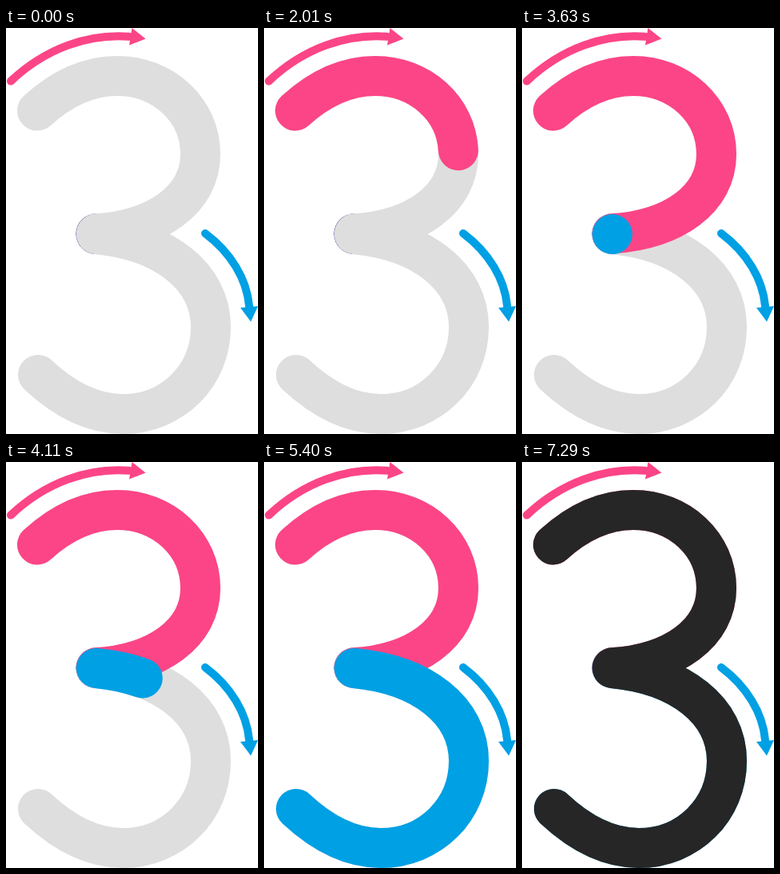
Animation of 315 by 508 pixels, one loop 9 s. Source, as an HTML page:

```html
<!DOCTYPE html>
<html lang="en">
<head>
<meta charset="utf-8">
<title>Writing the number 3</title>
<style>
  :root { --pink: #fc4586; --blue: #00a0e4; }
  html, body { margin: 0; width: 100%; height: 100%; overflow: hidden; background: #fff; }
  svg { display: block; width: 315px; height: 508px; }
  .line { fill: none; stroke-linecap: round; stroke-linejoin: round; }
  .digit { stroke-width: 50; }
  .arrow { stroke-width: 10; }
  .pen { stroke-dasharray: 1 2; animation: 9s linear infinite; }
  .top { stroke: var(--pink); animation-name: draw-top; }
  .bottom { stroke: var(--blue); animation-name: draw-bottom; }
  .done { stroke: #262626; animation: finish 9s linear infinite; }

  @keyframes draw-top {
    0%, 10.221% { opacity: 0; stroke-dashoffset: 1; }
    10.222% { opacity: 1; stroke-dashoffset: 1; animation-timing-function: cubic-bezier(.48, 0, .68, 1); }
    30%, 100% { opacity: 1; stroke-dashoffset: 0; }
  }
  @keyframes draw-bottom {
    0%, 40.221% { opacity: 0; stroke-dashoffset: 1; }
    40.222% { opacity: 1; stroke-dashoffset: 1; animation-timing-function: cubic-bezier(.48, 0, .68, 1); }
    60%, 100% { opacity: 1; stroke-dashoffset: 0; }
  }
  @keyframes finish {
    0%, 80% { opacity: 0; }
    81%, 100% { opacity: 1; }
  }
</style>
</head>
<body>
<svg viewBox="0 0 315 508">
  <defs>
    <path id="upper" pathLength="1" d="M39 103.5C68 77 101 60 139 60C197 60 243 103 243 158C243 214 190 252 113 257.3"/>
    <path id="lower" pathLength="1" d="M113 258C198 266 256 311 256 374C256 435 208 483 146 483C106 483 70 462 40 434"/>
  </defs>

  <circle cx="112.7" cy="257.6" r="25.3" fill="#4b3f9e"/>
  <g class="line digit" stroke="#dedede">
    <use href="#upper"/>
    <use href="#lower"/>
  </g>
  <use class="line digit pen top" href="#upper"/>
  <use class="line digit pen bottom" href="#lower"/>
  <g class="line digit done">
    <use href="#upper"/>
    <use href="#lower"/>
  </g>

  <path class="line arrow" stroke="var(--pink)" d="M6 66.5C50 25 103 7 154 10.8"/>
  <path fill="var(--pink)" d="M157.5 0L174.5 13.5L154 21.5Z"/>
  <path class="line arrow" stroke="var(--blue)" d="M249 257C281 281 301 314 304 348"/>
  <path fill="var(--blue)" d="M293 350L315 348L306 367.5Z"/>
</svg>
</body>
</html>
```
